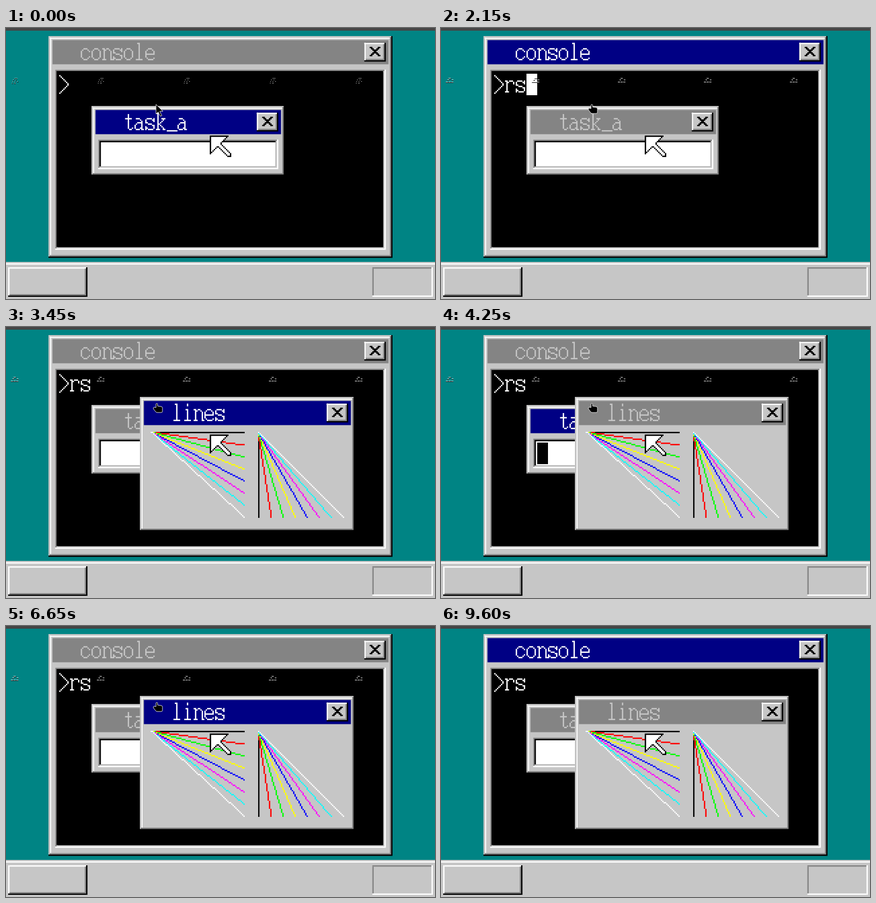
Animation, 798 px wide and 504 px high, one loop 9.65 s. Source, as an HTML page:

```html
<!DOCTYPE html>
<html lang="en">
<head>
<meta charset="utf-8">
<title>Desktop with console</title>
<style>
html, body { margin: 0; width: 100%; height: 100%; overflow: hidden; background: #464646; }
svg { display: block; width: 798px; height: 504px; }
</style>
</head>
<body>
<svg id="stage" viewBox="0 0 798 504" role="img" aria-label="Desktop with the windows console, task_a and lines"></svg>
<script>
const LOOP = 9650, SCALE = 2.5, LEFT = -1, TOP = 5;
const GREY = '#c6c6c6', DARK = '#848484', WHITE = '#fff', BLACK = '#000', NAVY = '#000084', TEAL = '#008484';

// Pen strokes of the 8x16 screen font: polylines of x,y cells.
const GLYPHS = {
  c: '6,7 4,5 2,5 0,7 0,11 2,13 4,13 6,11',
  o: '2,5 4,5 6,7 6,11 4,13 2,13 0,11 0,7 2,5',
  n: '0,5 1,5 1,13|1,6 2,6 3,5 4,5 6,7 6,13 7,13|0,13 2,13',
  s: '6,5 6,7|5,6 4,5 1,5 0,6 0,8 1,8 2,9 4,9 5,10 6,10 6,12 5,13 2,13 0,11 0,13',
  l: '2,1 3,1 3,13|1,13 5,13',
  e: '0,9 6,9 6,7 4,5 2,5 0,7 0,11 2,13 5,13 6,12',
  t: '3,2 3,12 4,13 5,13 6,12|1,5 5,5',
  a: '1,5 3,5 5,7 5,13 6,13|5,8 2,8 0,10 0,12 1,13 3,13 4,12',
  k: '0,1 1,1 1,13|0,13 2,13|4,5 6,5|5,5 5,6 2,9 5,12 5,13 6,13',
  i: '3,1 3,2|2,5 3,5 3,13|1,13 5,13',
  r: '0,5 1,5 1,13|0,13 2,13|1,6 2,6 3,5 5,5 6,6 6,7',
  _: '0,14 7,14',
  '>': '0,1 6,7 6,8 0,14'
};

function add(parent, tag, attrs) {
  const el = document.createElementNS('http://www.w3.org/2000/svg', tag);
  for (const key in attrs) el.setAttribute(key, attrs[key]);
  return parent.appendChild(el);
}
function group(parent, x, y) {
  return add(parent, 'g', { transform: `translate(${x} ${y})` });
}
// Box with both corners included.
function box(parent, fill, x0, y0, x1, y1) {
  return add(parent, 'rect', { x: x0, y: y0, width: x1 - x0 + 1, height: y1 - y0 + 1, fill });
}
const cell = (x, y) => `M${x} ${y}h1v1h-1z`;

function trace(strokes, ox = 0, oy = 0) {
  const cells = new Set();
  for (const stroke of strokes.split('|')) {
    const pts = stroke.split(' ').map(p => p.split(',').map(Number));
    for (let i = 1; i < pts.length; i++) {
      const [x0, y0] = pts[i - 1], [x1, y1] = pts[i];
      const n = Math.max(Math.abs(x1 - x0), Math.abs(y1 - y0));
      for (let k = 0; k <= n; k++) {
        cells.add(cell(ox + Math.round(x0 + (x1 - x0) * k / n), oy + Math.round(y0 + (y1 - y0) * k / n)));
      }
    }
  }
  return [...cells].join('');
}
function label(parent, text, x, y, fill = WHITE) {
  const d = [...text].map((ch, i) => trace(GLYPHS[ch], x + i * 8, y)).join('');
  return add(parent, 'path', { d, fill, 'aria-label': text });
}
function show(el, on) {
  el.setAttribute('visibility', on ? 'visible' : 'hidden');
}

function closeButton(parent, x, y) {
  const g = group(parent, x, y);
  box(g, BLACK, 0, 0, 15, 13);
  box(g, DARK, 1, 1, 14, 12);
  box(g, WHITE, 0, 0, 14, 0);
  box(g, WHITE, 0, 0, 0, 12);
  box(g, GREY, 1, 1, 13, 11);
  add(g, 'path', { d: trace('4,3 10,9|5,3 11,9|11,3 5,9|10,3 4,9'), fill: BLACK });
}
function makeWindow(parent, title, x, y, w, h) {
  const g = group(parent, x, y);
  box(g, BLACK, 0, 0, w - 1, h - 1);
  box(g, GREY, 0, 0, w - 2, 0);
  box(g, GREY, 0, 0, 0, h - 2);
  box(g, DARK, 1, 1, w - 2, h - 2);
  box(g, WHITE, 1, 1, w - 3, 1);
  box(g, WHITE, 1, 1, 1, h - 3);
  box(g, GREY, 2, 2, w - 3, h - 3);
  const bar = box(g, DARK, 3, 3, w - 4, 20);
  const text = label(g, title, 24, 4);
  closeButton(g, w - 21, 5);
  return { g, bar, text };
}
function textBox(g, x, y, w, h, fill) {
  const r = x + w, b = y + h;
  box(g, WHITE, x - 3, y - 3, r + 2, b + 2);
  box(g, DARK, x - 3, y - 3, r + 1, b + 1);
  box(g, GREY, x - 2, y - 2, r + 1, b + 1);
  box(g, BLACK, x - 2, y - 2, r, b);
  box(g, fill, x - 1, y - 1, r, b);
}
function activate(win, on) {
  win.bar.setAttribute('fill', on ? NAVY : DARK);
  win.text.setAttribute('fill', on ? WHITE : GREY);
}

function desktop(g) {
  box(g, TEAL, 0, 0, 319, 171);
  box(g, GREY, 0, 172, 319, 199);
  box(g, WHITE, 0, 173, 319, 173);
  box(g, WHITE, 3, 176, 59, 176);
  box(g, WHITE, 2, 176, 2, 196);
  box(g, DARK, 3, 196, 59, 196);
  box(g, DARK, 59, 177, 59, 195);
  box(g, BLACK, 2, 197, 59, 197);
  box(g, BLACK, 60, 176, 60, 197);
  box(g, DARK, 273, 176, 316, 176);
  box(g, DARK, 273, 177, 273, 196);
  box(g, WHITE, 273, 197, 316, 197);
  box(g, WHITE, 317, 176, 317, 197);
}
// Fixed-point line, both ends included; runs right and down.
function line(g, x0, y0, x1, y1, fill) {
  const w = x1 - x0, h = y1 - y0, n = Math.max(w, h) + 1;
  const dx = w >= h ? 1 : (w + 1) / n, dy = w >= h ? (h + 1) / n : 1;
  let d = '';
  for (let i = 0; i < n; i++) d += cell(x0 + Math.floor(i * dx), y0 + Math.floor(i * dy));
  add(g, 'path', { d, fill });
}
function fans(g) {
  for (let i = 0; i < 8; i++) {
    const color = `rgb(${(i & 1) * 255},${(i >> 1 & 1) * 255},${(i >> 2) * 255})`;
    line(g, 8, 26, 77, i * 9 + 26, color);
    line(g, 88, 26, i * 9 + 88, 89, color);
  }
}
function bigArrow(parent) {
  const g = group(parent, 152, 78);
  const edge = '13,0 0,0 0,13 5,8 6,8 13,15 15,15 15,13 8,6 8,5 13,0';
  add(g, 'polygon', { points: edge, transform: 'translate(.5 .5)', fill: WHITE });
  add(g, 'path', { d: trace(edge), fill: BLACK });
}

const stage = document.getElementById('stage');
const screen = add(stage, 'g', { transform: `translate(${LEFT} ${TOP}) scale(${SCALE})` });
desktop(screen);

const shell = makeWindow(screen, 'console', 32, 4, 256, 165);
textBox(shell.g, 8, 28, 240, 128, BLACK);
label(shell.g, '>', 8, 28);
const typed = [...'rs'].map((ch, i) => label(shell.g, ch, 16 + i * 8, 28));
const shellCaret = box(shell.g, WHITE, 0, 28, 7, 43);

const task = makeWindow(screen, 'task_a', 64, 56, 144, 52);
textBox(task.g, 8, 28, 128, 16, WHITE);
const taskCaret = box(task.g, BLACK, 8, 28, 15, 43);

const lines = makeWindow(screen, 'lines', 100, 50, 160, 100);
fans(lines.g);
bigArrow(screen);

// Outer pointer and its faint repeats across the screen.
const pointer = add(stage, 'g', {});
const arrow = add(pointer, 'g', {});
const hand = add(pointer, 'g', {});
const ink = { fill: BLACK, stroke: '#ddd', 'stroke-width': 1, 'stroke-linejoin': 'round' };
add(arrow, 'path', { d: 'M279 142v18l4-4 4 8 3-1-4-8h6z', ...ink });
add(hand, 'path', { d: 'M279 150v-7q1.5-2 3 0v4l7 1q2 .5 2 2.500v6q0 2.500-2 2.500h-8q-2 0-3-2l-4-5q0-3 2-3z', ...ink });

function ghost(parent, x, y, d, dash) {
  const g = group(parent, x, y);
  add(g, 'path', { d, stroke: BLACK, transform: 'translate(0 1.5)' });
  add(g, 'path', { d, stroke: WHITE, transform: 'translate(0 .5)', 'stroke-dasharray': dash });
}
for (let i = 0; i < 5; i++) {
  const x = 17 + i * 160;
  ghost(arrow, x, 98, 'M-1-5h5M-4-2h2M1-2h2M-5 1h1M-1 1h2M4 1h2M-6 4h2M-2 4h3', '1 1');
  ghost(hand, x, 97, 'M-3-4h5M-5-1h3M3-1h3M-8 3h14', '4 1');
}
box(stage, '#464646', 0, 0, 797, TOP - 1);

const within = (t, ...spans) => spans.some(([a, b]) => t >= a && t < b);

const focusPlan = [
  [0, task], [1100, shell], [3450, lines], [4250, task],
  [4950, shell], [6650, lines], [7450, task], [8350, shell]
];

function update(t) {
  const focus = focusPlan.filter(([at]) => t >= at).pop()[1];
  for (const win of [shell, task, lines]) activate(win, win === focus);

  typed.forEach((el, i) => show(el, t >= 1750 + i * 200));
  const count = t >= 1950 ? 2 : t >= 1750 ? 1 : 0;
  shellCaret.setAttribute('x', 16 + count * 8);
  show(shellCaret, within(t, [1150, 1650], [2150, 2400]));
  show(taskCaret, within(t, [100, 950], [4250, 4600], [7450, 7650], [8150, 8350]));
  show(lines.g, t >= 2450);

  const step = Math.max(0, Math.min(5, Math.floor((t - 8950) / 50) + 1));
  pointer.setAttribute('transform', `translate(${step * 23} ${step * -22})`);
  show(arrow, t < 50);
  show(hand, t >= 50 && t < 9250);
}

const start = performance.now();
function tick() {
  update((performance.now() - start) % LOOP);
  requestAnimationFrame(tick);
}
tick();
</script>
</body>
</html>
```
